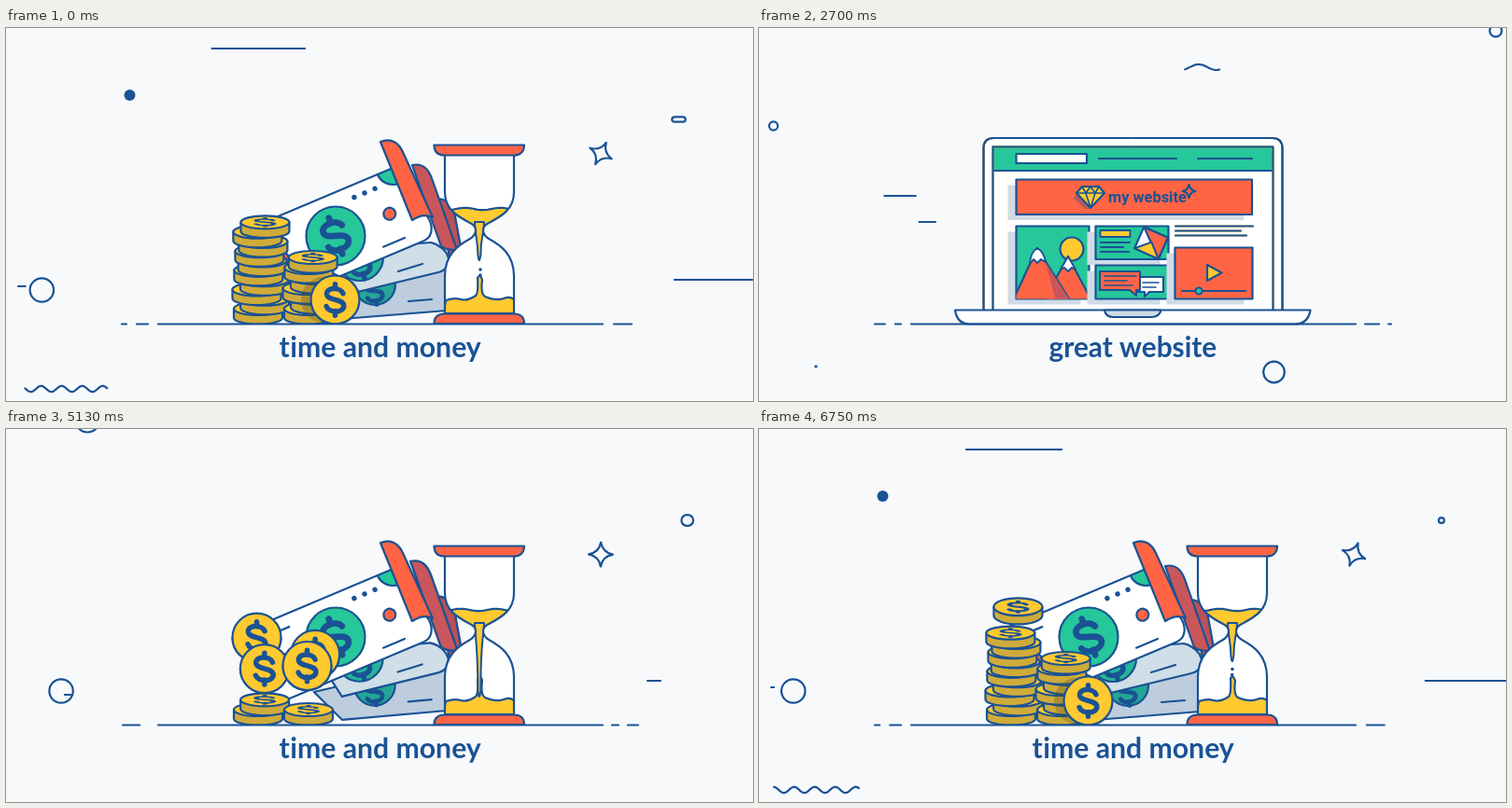
Recreate the animation shown at these times as an HTML page with a canvas. Size 800x400 px, loop 6.78 s.

```html
<!DOCTYPE html>
<html lang="en">
<head>
<meta charset="utf-8">
<title>Time, money and a website</title>
<style>
html, body { margin: 0; width: 100%; height: 100%; overflow: hidden; background: #f7f9fb; }
canvas { display: block; width: 800px; height: 400px; }
</style>
</head>
<body>
<canvas id="stage" width="800" height="400"></canvas>
<script>
const g = document.getElementById('stage').getContext('2d');
const LOOP = 6780, TAU = Math.PI * 2;
const BG = '#f7f9fb', BLUE = '#1a5294', RED = '#ff6445', GREEN = '#26c79b',
  GOLD = '#ffc930', DARK = '#cfab3a', WHITE = '#fff', SHADE = '#cfdce6';

const clamp = v => Math.max(0, Math.min(1, v));
const lerp = (a, b, p) => a + (b - a) * p;
const quad = v => 1 - (1 - clamp(v)) ** 2;
const out = v => 1 - (1 - clamp(v)) ** 3;
const into = v => clamp(v) ** 3;
const smooth = v => { v = clamp(v); return v * v * (3 - 2 * v); };
const back = v => { v = clamp(v) - 1; return 1 + 2.4 * v ** 3 + 1.4 * v * v; };
const ramp = (t, t0, dur) => (t - t0) / dur;
const age = (t, t0) => (t - t0 + LOOP) % LOOP;
// 0 to 1 after t0, back to 0 after t1, also across the loop point
const life = (t, t0, t1, din = 400, dout = 400) =>
  smooth(age(t, t0) / din) * (1 - smooth((age(t, t0) - age(t1, t0)) / dout));

function paint(fill, stroke = BLUE, w = 2.2) {
  if (fill) { g.fillStyle = fill; g.fill(); }
  if (stroke) { g.strokeStyle = stroke; g.lineWidth = w; g.stroke(); }
}
function shape(d, fill, stroke = BLUE, w = 2.2) {
  const p = new Path2D(d);
  if (fill) { g.fillStyle = fill; g.fill(p); }
  if (stroke) { g.strokeStyle = stroke; g.lineWidth = w; g.stroke(p); }
}
function disc(x, y, r, fill, stroke, w) {
  if (r <= 0.1) return;
  g.beginPath(); g.arc(x, y, r, 0, TAU); paint(fill, stroke, w);
}
function box(x, y, w, h, fill, stroke, lw) {
  g.beginPath(); g.rect(x, y, w, h); paint(fill, stroke, lw);
}
function line(x0, y0, x1, y1, c, w) {
  g.beginPath(); g.moveTo(x0, y0); g.lineTo(x1, y1); paint(null, c, w);
}
function dash(x0, x1, y, c, w) {
  if (x1 - x0 > 0.6) line(x0 + 1, y, Math.max(x0 + 1.2, x1 - 1), y, c, w);
}
function at(x, y, rot, sx, sy, fn) {
  g.save(); g.translate(x, y); g.rotate(rot); g.scale(sx, sy); fn(); g.restore();
}
const around = (x, y, rot, k, fn) => at(x, y, rot, k, k, () => { g.translate(-x, -y); fn(); });
function clipBox(x, y, w, h, fn) {
  g.save(); g.beginPath(); g.rect(x, y, w, h); g.clip(); fn(); g.restore();
}
// draw a path on, leading colours ahead of the final one
function trace(d, len, u, lag, cols) {
  g.save();
  cols.forEach((c, i) => {
    const p = out(u - i * lag);
    if (p <= 0) return;
    g.setLineDash(p < 1 ? [len * p, 9999] : []);
    shape(d, null, c);
  });
  g.restore();
}
function words(str, font, x, y, t, t0, tOut, gap, amp) {
  g.font = font; g.fillStyle = BLUE; g.textBaseline = 'alphabetic';
  let word = 0;
  for (let i = 0; i < str.length; i++) {
    if (str[i] === ' ') { word++; continue; }
    const s = t - t0 - word * gap - i * 6, o = t - tOut - i * 8;
    if (s < 0) continue;
    const k = back(s / 70) * (1 - into(o / 130));
    if (k <= 0.02) continue;
    const w = g.measureText(str[i]).width;
    const px = x + g.measureText(str.slice(0, i + 1)).width - w / 2;
    const swing = Math.exp(-s / 120);
    at(px, y + amp * swing * Math.cos(s / 60), -0.25 * swing * Math.sin(s / 60), k, k,
      () => g.fillText(str[i], -w / 2, 0));
  }
}
function sparkle(x, y, r, rot, fill) {
  if (r < 0.5) return;
  at(x, y, rot, 1, 1, () => {
    g.beginPath(); g.moveTo(0, -r);
    for (let i = 1; i <= 4; i++) {
      const a = i * TAU / 4, m = a - TAU / 8;
      g.quadraticCurveTo(Math.sin(m) * r * 0.22, -Math.cos(m) * r * 0.22, Math.sin(a) * r, -Math.cos(a) * r);
    }
    g.closePath(); paint(fill);
  });
}
function burst(x, y, t, t0) {
  const s = (t - t0) / 160;
  if (s < 0 || s > 2.4) return;
  const p = 1.39 * out(s * 0.55), k = Math.min(1, (2.4 - s) / 1.4);
  const spot = (dx, dy, fn) => at(x + dx * p, y + dy * p, 0, k, k, fn);
  spot(-23, -5, () => line(-3, 0, 4, -1));
  spot(-15, 4, () => disc(0, 0, 2.8, null, GREEN));
  spot(-22, 20, () => line(-2, 2, 2, -1, GOLD));
  spot(21, 1, () => disc(0, 0, 2.3, RED, null));
  spot(-7, -21, () => disc(0, 0, 1.1, BLUE, null));
  spot(4, -7, () => disc(0, 0, 1.2, BLUE, null));
  spot(24, -42, () => line(-2, 4, 2, -4, GREEN));
}

/* floating marks */
// a stroke whose head runs ahead of its tail
function streak(t, t0, from, to, y, lag, dur, curve, ease = quad) {
  const a = age(t, t0), head = lerp(from, to, ease(a / dur)), tail = lerp(from, to, ease((a - lag) / dur));
  const x0 = Math.min(head, tail), x1 = Math.max(head, tail);
  if (!curve) return dash(x0, x1, y);
  if (x1 - x0 < 0.6) return;
  g.beginPath();
  for (let x = x0; x <= x1; x++) g.lineTo(x, y + curve(x));
  paint();
}
function ring(x, y, r, stretch = 0) {
  if (r < 0.4) return;
  g.beginPath(); g.roundRect(x - r - stretch / 2, y - r, r * 2 + stretch, r * 2, r);
  paint(r < 1.2 ? BLUE : null, BLUE, Math.min(2.2, r));
}
function marks(t) {
  const T = t < 2000 ? t + LOOP : t, settle = Math.exp(-Math.max(0, t - 3660) / 700);

  streak(t, 5600, 328, 205, 22, 1130, 1800);
  streak(t, 5600, -6, 113, 387, 1010, 1450, x => 3.2 * Math.sin((x - 19) / 22 * TAU - 0.6));
  streak(t, 6720, 12, 133, 277, 330, 1490);
  streak(t, 4530, 140, 12, 285, 80, 1600);
  streak(t, 4620, 686, 920, 270, 1458, 3200, null, smooth);
  streak(t, 3400, 640, 700, 249, 150, 1000);
  streak(t, 1660, 75, 200, 180, 480, 2080);
  streak(t, 1700, 130, 212, 208, 400, 2080);
  streak(t, 2700, 150, 204, 69, 300, 1000);
  streak(t, 1670, 401, 525, 42, 500, 2080, x => 3 * Math.sin((x - 518) / 6));

  const r = 6 * life(t, 5600, 1200, 500), hole = t < 1200 ? 6 * smooth(t / 1150) : 0;
  if (hole < 0.2) disc(132.5, 72, r, BLUE, null);
  else if (hole < 5.9) disc(132.5, 72, (6 + hole) / 2, null, BLUE, 6 - hole);

  ring(789, 3, 13 * life(t, 700, 2500));
  ring(88 - 6 * settle, -9, 12.5 * life(t, 3350, 5400, 250, 900), 3 * settle);
  ring(731 - 10.5 * settle, 98, 5.8 * life(t, 3350, 6000, 250, 1500), 9 * settle);
  ring(15.5, 105, 4.6 * life(t, 790, 3000, 500));
  ring(61, 363, 2.2 * life(t, 760, 2500, 500));
  ring(551.5, 369, 11.3 * life(t, 700, 2800));

  const k = life(t, 3600, 1200, 300, 950);
  const shift = smooth(ramp(T, 4522, 1275)) - smooth(ramp(T, 6380, 1400));
  disc(88 - 62 * shift, 281, 12.7 * k, null, BLUE, 0.7 + 1.5 * k * k);

  sparkle(637, 134.5, 13 * life(t, 3300, 200, 300, 500), 0.1 * settle + 0.36 * smooth(ramp(T, 5700, 1000)));
}

function ground(t) {
  const half = t > 4000 ? 238 * out(ramp(t, 4430, 310)) : 238 * (1 - into(ramp(t, 3120, 300)));
  if (half > 1) {
    const s = t - 4440;
    const bend = s > 0 ? 70 * Math.exp(-s / 95) * Math.cos(s / 48) : 0;
    g.beginPath(); g.moveTo(401 - half, 317.5);
    g.quadraticCurveTo(401, 317.5 + bend, 401 + half, 317.5); paint();
  }
  const grow = t > 4000 ? clamp(ramp(t, 4550, 250)) : 1 - clamp(ramp(t, 3050, 150));
  if (grow <= 0) return;
  const move = 58 / LOOP * t % 29;
  for (let i = -4; i < 5; i++) {
    const l = 139 - move + i * 29, r = 650 + move + i * 29;
    dash(Math.max(l, 123), Math.min(l + 20 * grow, 153), 317.5);
    dash(Math.max(r, 648), Math.min(r + 21 * grow, 678), 317.5);
  }
}

/* money */
function dollar(x, y, s, rot = 0, sq = 1) {
  at(x, y, rot, s, s * sq, () => {
    shape('M.5,-.4C.35,-.8,-.55,-.82,-.53,-.36C-.5,.08,.55,-.08,.55,.38C.52,.84,-.4,.84,-.55,.42M0,-.98V-.7M0,.7V.98', null, BLUE, 0.32);
  });
}
function coin(x, y, e, r = 26) {
  const d = 10 * Math.sqrt(Math.max(0, 1 - e * e));
  g.beginPath(); g.moveTo(x - r, y); g.lineTo(x - r, y + d);
  g.ellipse(x, y + d, r, r * e, 0, Math.PI, 0, true);
  g.lineTo(x + r, y); paint(DARK);
  g.beginPath(); g.ellipse(x, y, r, r * e, 0, 0, TAU); paint(GOLD);
  dollar(x, y, r * 0.66, 0, e);
}
// coins leap from the ground one by one and land flat
function stack(t, x, count, pitch, first, step) {
  const flying = [];
  for (let i = 0; i < count; i++) {
    const p = ramp(t, first + i * step - 450, 450);
    if (p <= 0) continue;
    const q = Math.min(1, p) ** 0.6, cx = x + (i % 2 ? 4 : -2) + 1.5 * Math.sin(i * 2.3);
    const y = lerp(340, 301 - pitch * i, q) - 4 * (70 + 9 * i) * q * (1 - q);
    const draw = () => coin(cx, y, 0.27 + 0.73 * Math.min(1, (9 - 9 * q) ** 2));
    if (q < 1) flying.push(draw); else draw();
  }
  flying.forEach(f => f());
}
function note(t) {
  const p = out(ramp(t, 4660, 320)), hide = 120 * (1 - out(ramp(t, 4470, 190)));
  const w = lerp(76, 185, p), h = 85, young = p < 0.15;
  at(lerp(220, 244, p), 222 + hide, lerp(-0.37, -0.4, p), 1, 1, () => {
    const bulge = w + 19 * p;
    const edge = `M0,0H${w}V52C${bulge},50,${bulge},${h},${w},${h}H0Z`;
    shape(edge, WHITE, null);
    g.save(); g.clip(new Path2D(edge));
    if (p < 1) box(lerp(38, w, p), 0, w, h, RED, null);
    [[0, 0], [0, h], [w, 0]].forEach(c => disc(c[0], c[1], 18, GREEN));
    if (p > 0.5) {
      // the print is the same when turned by half
      for (const turn of [0, Math.PI]) at(100.5, 44, turn, 1, 1, () => {
        for (let i = 0; i < 3; i++) disc(34 + i * 12, -31, 2.7, BLUE, null);
        disc(62, 0, 6.5, RED);
        line(42, 30, 67, 30);
      });
    }
    g.restore();
    shape(edge, null, p < 0.4 ? GOLD : BLUE);
    if (p < 0.4) line(0, 0, 0, h);
  });
  const x = lerp(330, 353, p), y = 223 + hide, r = lerp(35, 31.5, p);
  disc(x, y, r, GREEN, young ? GREEN : BLUE);
  if (young) [[-0.9, BLUE], [0.6, RED]].forEach(([a, c]) => {
    g.beginPath(); g.arc(x, y, r, a, a + 1.2); paint(null, c);
  });
  dollar(x, y, lerp(27, 21, p), lerp(-0.1, -0.36, p));
}
function flap(t, t0, x, y, d, color) {
  const k = back(ramp(t, t0, 220));
  if (k > 0.02) around(x, y, 0, k, () => shape(d, color));
}
function rearNotes(t) {
  const p = back(ramp(t, 4900, 260));
  if (p <= 0) return;
  flap(t, 5020, 480, 255, 'M463,183C476,184,479,194,481,202L492,262H478Z', '#b9505a');
  around(330, 317, 0.5 * (1 - p), 1, () => {
    shape('M330,282L472,250V303L360,312Z', '#bdcddd');
    disc(395, 275, 22, '#25a595'); dollar(394, 282, 15, -0.2);
    line(431, 293, 456, 291);
  });
  flap(t, 4970, 470, 240, 'M435,147C449,144,454,155,457,164L483,238C478,238,470,238,466,234Z', '#c9565a');
  around(330, 317, 0.35 * (1 - p), 1, () => {
    shape('M330,240L455,230C475,235,482,257,463,262L360,287Z', '#cfdee7');
    disc(379, 246, 25, '#25b598'); dollar(379, 252, 17, -0.3);
    line(420, 261, 446, 253);
  });
}
const GLASS = 'M470,136V176C470,196,486,203,497,209Q503,212,503,217Q503,222,497,226C484,233,470,243,470,266V306H544V266C544,243,530,233,517,226Q511,222,511,217Q511,212,517,209C528,203,544,196,544,176V136Z';
function hourglass(t) {
  const p = clamp(ramp(t, 4440, 460)), fresh = 1 - clamp(ramp(t, 4700, 250));
  if (p <= 0) return;
  at(507, 317 + 195 * (1 - p) - 640 * p * (1 - p), 0, lerp(0.86, 1, p), lerp(0.98, 1, p), () => {
    g.translate(-507, -317);
    shape(GLASS, WHITE, null);
    g.save(); g.clip(new Path2D(GLASS));
    // the sand has a loose block on top until it settles
    const wave = x => 1.2 * Math.sin(x / 6 + t / 140);
    const block = x => Math.abs(x - 508) < 23 ? 46 * fresh : 0;
    g.beginPath(); g.moveTo(465, 222);
    for (let x = 472; x <= 544; x += 2) g.lineTo(x, 194 + wave(x) * (1 + 2 * fresh) - block(x));
    g.lineTo(550, 222); g.closePath(); paint(GOLD);
    for (let i = 0; i < 7 && fresh > 0.05; i++) {
      const x = 490 + i * 23 % 37, y = 150 + i * 17 % 36, s = 5 * fresh;
      at(x, y, i * 1.3 + t / 300, s, s, () => shape('M-1,-.5L.2,-1L1,.1L.2,.9L-.8,.6Z', WHITE, BLUE, 0.4));
    }
    const wob = Math.sin(t / 90);
    shape(`M471,292Q480,289,487,291T503,287Q506,284,505,${268 + wob * 2}Q508,263,510,${270 - wob}Q508,285,513,288Q525,293,533,290T545,292V308H468Z`, GOLD);
    const end = lerp(226, 288, out(ramp(t, 4700, 500))) - 38 * smooth(ramp(t, 5700, 1050));
    shape(`M502,208C502,220,505,226,505.5,${end - 6}Q507,${end + 5},508.5,${end - 8}C508,226,512,221,512,208Z`, GOLD, BLUE, 2);
    for (let y = end + 5 + t / 20 % 5; y < 268; y += 6) disc(507 + Math.sin(y), y, 1.8, BLUE, null);
    g.restore();
    const bare = fresh > 0.4 ? 210 : 130;
    clipBox(450, bare, 110, 320 - bare, () => shape(GLASS));
    if (fresh > 0.4) clipBox(480, 208, 54, 32, () => shape(GLASS, null, RED));
    shape('M458.5,125.5H555C555,133,550,136.5,544,136.5H470C463,136.5,458.5,133,458.5,125.5Z', RED);
    shape('M458.5,317H555C555,309,550,306.5,544,306.5H470C463,306.5,458.5,309,458.5,317Z', RED);
  });
}
function money(t) {
  const T = t < 2000 ? t + LOOP : t;
  if (T < 4440 || T > LOOP + 560) return;
  const sink = (lag, fn) => at(0, 225 * into(ramp(T, LOOP + 180 + lag, 330)), 0, 1, 1, fn);
  clipBox(0, -20, 800, 337.5, () => {
    sink(40, () => {
      rearNotes(T);
      if (T > 4470) note(T);
      flap(T, 4880, 440, 206, 'M401,122C413,117,421,124,425,133L457,203C449,199,441,202,435,206Z', RED);
    });
    sink(0, () => {
      stack(T, 272, 10, 10.3, 4926, 206);
      stack(T, 326, 6, 11, 5090, 220);
      const y = lerp(345, 291.5, back(ramp(T, 5630, 260)));
      if (T > 5630) {
        clipBox(300, 240, 54, 80, () => disc(341, y, 25, 'rgba(90,80,20,.3)', null));
        disc(352.5, y, 26, GOLD); dollar(352.5, y, 17);
      }
    });
    sink(50, () => hourglass(T));
  });
  words('time and money', '700 30.2px Lato, sans-serif', 292.5, 353, T, 4400, LOOP + 250, 58, 15);
}

/* website */
function card(x, y, w, h, fill, draw) {
  if (w < 1 || h < 1) return;
  box(x - 9, y + 6, w, h, SHADE, null);
  box(x, y, w, h, fill);
  if (draw) clipBox(x, y, w, h, draw);
}
function gem(x, y, k, rot) {
  at(x, y, rot, k, k, () => {
    shape('M-15,-4L-18,2L-6,13L0,13Z', 'rgba(26,82,148,.35)', null);
    shape('M-9,-11H9L15,-4L0,12L-15,-4Z', GOLD);
    shape('M-15,-4H15M-9,-11L-5,-4L0,12L5,-4L9,-11M-5,-4L0,-11L5,-4', null, BLUE, 1.6);
  });
}
function picture(t) {
  const dy = 80 * (1 - back(ramp(t, 1020, 280)));
  disc(335, 237 + dy * 1.3, 12.5, GOLD);
  at(0, dy, 0, 1, 1, () => {
    shape('M305,292L331,245L356,292Z', RED);
    shape('M323,259L331,245L339,259L335,257L331,261L327,257Z', WHITE, BLUE, 1.8);
    shape('M272,292L298,236L333,292Z', RED);
    shape('M306,250L333,292H318Z', '#c9565a', null);
    shape('M290,253Q291,240,298,236Q305,240,307,251L302,248L298,252L294,248Z', WHITE, BLUE, 1.8);
  });
}
function letter(t) {
  const p = back(ramp(t, 860, 300)), len = out(ramp(t, 860, 200));
  box(365.5, 217, 32 * out(ramp(t, 980, 200)), 7, GOLD, BLUE, 1.8);
  [33, 26, 32].forEach((w, i) => dash(365, 365 + w * len, 230 + i * 5, i === 1 && t < 1000 ? GOLD : BLUE, 2));
  at(lerp(414, 420, p), 230.5, 0.42 * p, lerp(0.3, 1, p), 1, () => {
    box(-14, -12.5, 28, 25, WHITE);
    shape('M-14,-12.5H14V12.5L0,0Z', RED);
    shape('M-14,12.5L0,-1L14,12.5Z', GOLD, BLUE, 2);
  });
}
function chat(t) {
  const a = back(ramp(t, 1080, 220)), b = back(ramp(t, 1180, 220));
  if (b > 0.02) at(433, 283, 0, b, b, () => {
    shape('M-29,-16H0V0H-15L-20,5V0H-29Z', WHITE, BLUE, 2);
    line(-22, -10, -5, -10, BLUE, 1.6); line(-22, -5, -8, -5, BLUE, 1.6);
  });
  if (a > 0.02) at(365, 261, 0, a, a, () => {
    shape('M0,0H43V20H39V26L32,20H0Z', RED, BLUE, 2);
    [34, 24, 30].forEach((w, i) => line(5, 5 + i * 5, 5 + w, 5 + i * 5, BLUE, 1.7));
  });
}
function video(t) {
  const p = back(ramp(t, 1280, 240));
  if (p > 0.02) at(487, 262.5, 0, p, p, () => shape('M-7,-8.5L8.5,0L-7,8.5Z', GOLD));
  dash(452, 452 + 70 * out(ramp(t, 1350, 240)), 282, BLUE, 2);
  if (t > 1380) disc(lerp(453, 471, clamp(ramp(t, 1400, 300))), 282, 3.6, GREEN, BLUE, 2);
}
function website(t) {
  if (t < 430 || t > 3330) return;
  const k = 1 - into(ramp(t, 3020, 290));
  if (k > 0.02) around(400, 317, 0, k, () => {
    const up = out(ramp(t, 540, 260));
    if (up > 0) clipBox(230, 302 - 186 * up, 340, 190 * up, () => {
      g.beginPath(); g.roundRect(240.5, 118, 320, 200, 11); paint(WHITE, null);
    });
    const lid = ramp(t, 500, 388), rim = ramp(t, 800, 310);
    const halves = fn => [1, -1].forEach(s => at(400.5, 0, 0, s, 1, fn));
    halves(() => trace('M-160,302V129Q-160,118,-149,118H0', 339, lid, 0.3, [GREEN, RED, BLUE]));
    clipBox(250, 126, 300.5, 177, () => page(t));
    halves(() => trace('M-150,302V127.5H0', 324, rim, 0.13, [GOLD, BLUE]));
    const b = back(ramp(t, 450, 230));
    if (b > 0.02) at(400, 0, 0, b, 1, () => {
      g.translate(-400, 0);
      shape('M210,302.5H590.5Q588,317.5,574,317.5H226Q212,317.5,210,302.5Z', WHITE);
      shape('M370,302.5H430.5Q429,310,420,310H380Q371,310,370,302.5Z', SHADE);
    });
  });
  words('great website', '700 29.8px Lato, sans-serif', 310.5, 353, t, 750, 3030, 70, 14);
}
function page(t) {
  // each block folds away again near the end
  const fold = i => 1 - into(ramp(t, 2800 + i * 40, 180));
  const b = out(ramp(t, 824, 220)) * fold(0);
  if (b > 0) card(lerp(402, 275.5, b), 162.5, 252.5 * b, 37.5, RED);
  if (t > 830 && fold(0) > 0.4) {
    const tilt = 1 - clamp(ramp(t, 900, 200));
    gem(355, 181 - 5 * tilt, back(ramp(t, 840, 200)) * fold(0), -0.45 * tilt);
    words('my website', '700 16.4px Roboto, sans-serif', 374, 187, t, 815, 2780, 12, 6);
    sparkle(460.5, 175, 7 * back(ramp(t, 1250, 220)) * fold(0), 0, RED);
  }
  card(275.5, 212.5, 78, 78 * out(ramp(t, 854, 220)) * fold(1), GREEN, () => picture(t));
  card(360.5, 212.5, 78, 35.5 * out(ramp(t, 810, 190)) * fold(2), GREEN, () => letter(t));
  const c = out(ramp(t, 880, 240));
  if (c > 0) card(360.5, lerp(304, 254.5, c), 78, 36 * fold(3), GREEN, () => chat(t));
  const d = out(ramp(t, 845, 210));
  if (d > 0) {
    const y = lerp(212.5, 235.5, out(ramp(t, 1300, 220)));
    card(lerp(560, 445.5, d), y, 83, (290.5 - y) * fold(4), RED, () => video(t));
  }
  if (fold(4) > 0.5) [83, 70, 76].forEach((w, i) =>
    trace(`M446,${212.5 + i * 5}h${w}`, w, ramp(t, 1630 + i * 25, 300), 0.09, [GOLD, BLUE]));

  const h = back(ramp(t, 1120, 240)) * fold(5);
  if (h > 0) at(0, -32 * (1 - h), 0, 1, 1, () => {
    box(250.5, 120, 300, 33, GREEN);
    box(275.5, 135, 75.5 * out(ramp(t, 1260, 200)), 10, WHITE);
    dash(363, 363 + 85 * out(ramp(t, 1400, 240)), 140);
    dash(469, 469 + 60 * out(ramp(t, 1450, 240)), 140);
    const s = ramp(t, 1560, 240);
    if (s > 0 && s < 1) {
      const x = 352 + s * 30, swell = Math.sin(Math.PI * s);
      line(x, 131, x + 20 * swell, 127, WHITE);
      g.beginPath(); g.arc(x + 17, 125, 10, 0.6, 0.6 + 1.3 * swell); paint();
      disc(378, 130 + s * 32, 2.8 * (1 - s * 0.3), null, GOLD, 2);
      disc(366, 130 + s * 36, 1.8, RED, null);
      disc(374, 130 - s * 12, 1.1, BLUE, null);
    }
  });
}

function ball(t) {
  const s = t - 3530;
  if (s < 0 || s > 895) return;
  const k = back(s / 100), x = 147 + 243 * s / 890, y = 85 - 0.56 * s + 0.00092 * s * s;
  at(x, y, 0.2 + Math.max(0, s - 130) / 400, k, k, () => {
    g.beginPath(); g.ellipse(0, 0, 13, 16, 0, 0, TAU); paint(RED);
    g.beginPath(); g.arc(-1, -1, 9, -2, 0.3); paint();
    disc(7, 5, 1.2, BLUE, null);
  });
}

const start = performance.now();
function frame() {
  const t = (performance.now() - start) % LOOP;
  g.setTransform(1, 0, 0, 1, 0, 0);
  g.fillStyle = BG; g.fillRect(0, 0, 800, 400);
  g.lineCap = g.lineJoin = 'round';
  marks(t);
  money(t);
  website(t);
  ground(t);
  ball(t);
  burst(150, 85, t, 3500);
  burst(398, 328, t, 4490);
  requestAnimationFrame(frame);
}
frame();
</script>
</body>
</html>
```
